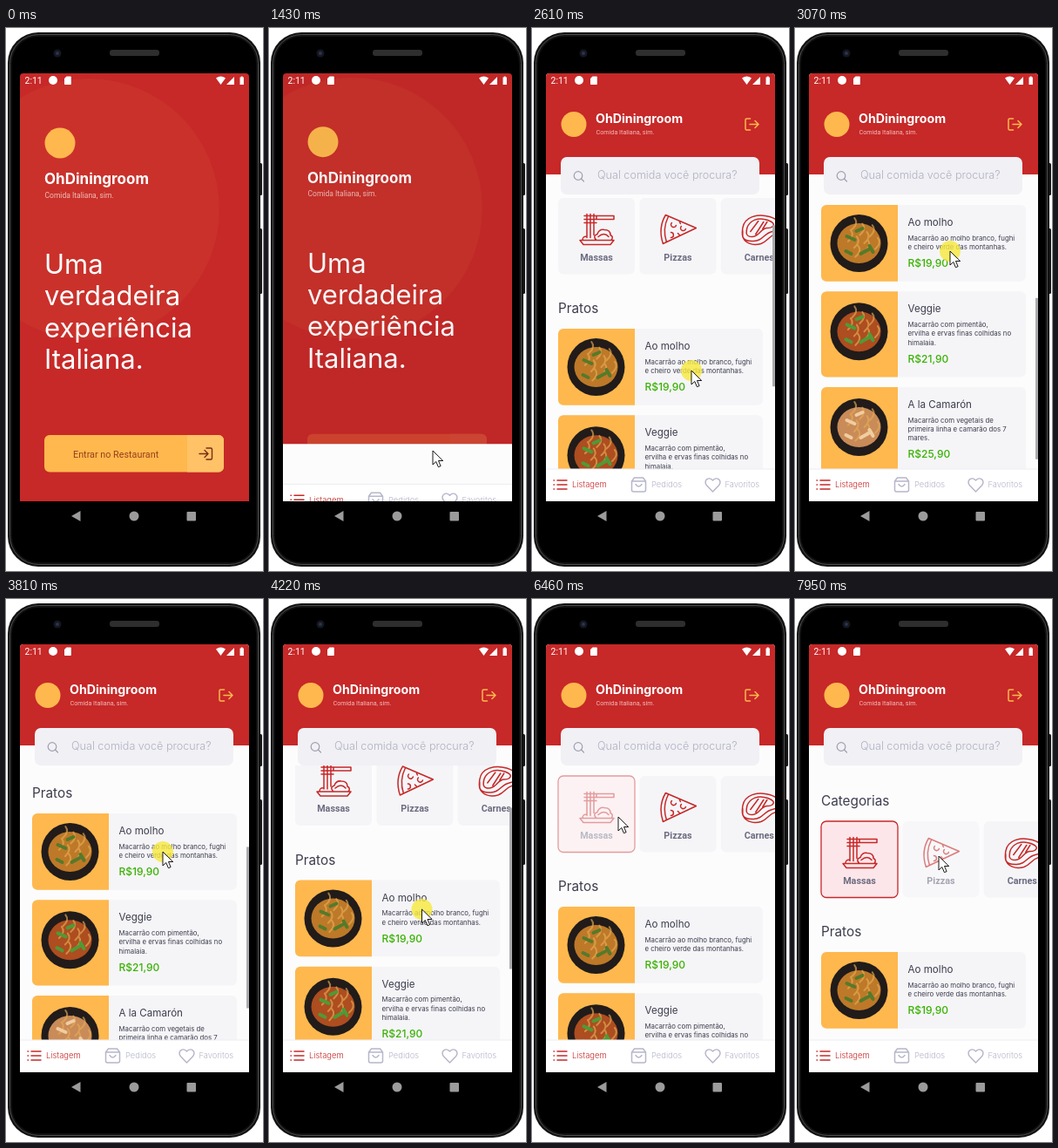
Write an HTML page that moves like this. It is 295 px wide and 623 px high and loops after 8000 ms.

```html
<!DOCTYPE html>
<html lang="pt-BR">
<head>
<meta charset="utf-8">
<title>OhDiningroom</title>
<style>
html, body { margin: 0; width: 100%; height: 100%; overflow: hidden; background: #fff; }
svg { display: block; width: 100%; height: 100%; }
text { font-family: Inter, "Open Sans", sans-serif; }
.rb { font-family: Roboto, Inter, sans-serif; }
.brand { font-weight: 700; fill: #fff; }
.line { fill: none; stroke-linecap: round; stroke-linejoin: round; }
.h1 { font-size: 31px; fill: #fff; }
.h2 { font-size: 15.3px; fill: #3d3d4d; }
.name { font-size: 11.6px; fill: #3d3d4d; }
.desc { font-size: 7.8px; fill: #3d3d4d; }
.price { font-size: 12px; font-weight: 500; fill: #39b100; }
.cat { font-size: 10.8px; font-weight: 600; fill: #6c6c80; text-anchor: middle; }
.tab { font-size: 9.4px; font-weight: 300; fill: #b7b7cc; }
</style>
</head>
<body>
<svg viewBox="0 0 295 623">
  <defs>
    <clipPath id="screenClip"><path d="M16 543V56q0-4 4-4h255q4 0 4 4v487z"/></clipPath>
    <clipPath id="revealClip"><rect id="reveal" x="16" y="52" width="263" height="491"/></clipPath>
    <clipPath id="listClip"><rect x="16" y="191" width="263" height="315"/></clipPath>
  </defs>

  <!-- phone body -->
  <g>
    <rect x="289" y="155" width="5" height="37" rx="1.5" fill="#161616"/>
    <rect x="289" y="230" width="5" height="75" rx="1.5" fill="#161616"/>
    <rect x="2" y="5" width="290" height="613" rx="35" fill="#111"/>
    <rect x="4.500" y="7.500" width="285" height="608" rx="33" fill="none" stroke="#4a4a4a"/>
    <rect x="7" y="10" width="280" height="603" rx="30" fill="#000"/>
    <rect x="119" y="25" width="57" height="7" rx="3" fill="#2e2e2e"/>
    <circle cx="59" cy="29" r="4.500" fill="#15171f"/>
    <circle cx="59" cy="29" r="2" fill="#2b3350"/>
    <g fill="#9b9b9b">
      <path d="M75 560l10.500-6v12z"/>
      <circle cx="147" cy="560" r="5.500"/>
      <rect x="207.500" y="555" width="10.500" height="10.500" rx="1"/>
    </g>
  </g>

  <g clip-path="url(#screenClip)">
    <!-- welcome screen -->
    <rect x="16" y="52" width="263" height="491" fill="#c72828"/>
    <g id="welcome">
      <circle cx="95" cy="208" r="150" fill="#ca312b"/>
      <circle cx="62" cy="132" r="17.500" fill="#ffb84d"/>
      <text class="brand" x="44" y="179" font-size="17">OhDiningroom</text>
      <text class="rb" x="44.500" y="194.500" font-size="8.500" fill="#f0bdb9">Comida Italiana, sim.</text>
      <g class="h1">
        <text x="44" y="282">Uma</text>
        <text x="44" y="318">verdadeira</text>
        <text x="44" y="354.500">experiência</text>
        <text x="44" y="391">Italiana.</text>
      </g>
      <g id="enter">
        <rect x="44" y="467" width="206" height="42.500" rx="6" fill="#ffb84d"/>
        <path d="M208 467h36a6 6 0 0 1 6 6v30.500a6 6 0 0 1-6 6h-36z" fill="#ffc267"/>
        <text class="rb" x="77" y="492.500" font-size="10.800" fill="#993d1c">Entrar no Restaurant</text>
        <path class="line" d="M230 482h5q1.500 0 1.500 1.500v10q0 1.500-1.500 1.500h-5M222 488.500h10m-4-4 4 4-4 4" stroke="#7a2d16" stroke-width="1.400"/>
      </g>
    </g>
    <rect id="shade" x="16" y="52" width="263" height="491" opacity="0"/>

    <!-- menu screen -->
    <g clip-path="url(#revealClip)">
      <g id="home">
        <rect x="16" y="52" width="263" height="491" fill="#fcfcfd"/>
        <rect x="16" y="32" width="263" height="136" fill="#c72828"/>
        <circle cx="48" cy="110.500" r="14.500" fill="#ffb84d"/>
        <text class="brand" x="73" y="108.500" font-size="14.200">OhDiningroom</text>
        <text class="rb" x="73.500" y="122" font-size="7.200" fill="#f0bdb9">Comida Italiana, sim.</text>
        <path class="line" d="M250.500 104h-4q-1.500 0-1.500 1.500v10q0 1.500 1.500 1.500h4M250 110.500h10m-4-4 4 4-4 4" stroke="#ffb84d" stroke-width="1.500"/>
        <g clip-path="url(#listClip)">
          <g id="list">
            <text class="h2" x="30" y="236.500">Categorias</text>
            <text class="h2" x="30" y="387">Pratos</text>
            <g id="cats"></g>
            <g id="dishes"></g>
          </g>
          <rect id="bar" x="276" width="3" height="185" fill="#a9a9ae"/>
        </g>
        <rect x="33" y="148" width="228" height="43" rx="7" fill="#f0f0f5"/>
        <g class="line" stroke="#a0a0b0" stroke-width="1.200">
          <circle cx="53" cy="169.500" r="4.800"/><path d="M56.500 173l3 3"/>
        </g>
        <text x="75" y="172.800" font-size="12.600" font-weight="300" fill="#b0b0c2">Qual comida você procura?</text>
        <rect x="16" y="506" width="263" height="60" fill="#fff"/>
        <path d="M16 506h263" stroke="#ececf2"/>
        <g class="line" stroke-width="1.500">
          <path d="M29 519h11M29 524h11M29 529h11M25 519h.5M25 524h.5M25 529h.5" stroke="#c72828"/>
          <g stroke="#b7b7cc">
            <path d="M114.500 520l3-4h10l3 4v10q0 2-2 2h-12q-2 0-2-2zh16M119 523.500q3.500 5 7 0"/>
            <path d="M207.500 532l-7-7.200c-4.500-5.500 2.500-11 7-5.800 4.500-5.200 11.500.3 7 5.800z"/>
          </g>
        </g>
        <text class="tab" x="46" y="527.200" style="fill:#c72828">Listagem</text>
        <text class="tab" x="137" y="527.200">Pedidos</text>
        <text class="tab" x="221.500" y="527.200">Favoritos</text>
      </g>
    </g>

    <!-- status bar -->
    <g fill="#fff">
      <text class="rb" x="21.500" y="64" font-size="10.500">2:11</text>
      <circle cx="54" cy="60" r="5"/>
      <path d="M69.500 55.500h4.500q.8 0 .8.800v8q0 .8-.8.800h-6.200q-.8 0-.8-.8v-6.300z"/>
      <path d="M241 57.500q5.500-4 11 0l-5.500 7.500z"/>
      <path d="M262 56v9h-9z"/>
      <path d="M268.500 56.500h1.200v-1h2v1h1.200v8.500h-4.400z"/>
    </g>
  </g>

  <g id="pointer">
    <circle id="press" r="12" fill="#f7e93c" opacity=".8"/>
    <path d="M0 0v16l3.800-3.500 2.600 6.200 2.700-1.100-2.600-6.100h5.200z" fill="#fff" stroke="#000" stroke-width=".9"/>
  </g>
</svg>

<script>
const $ = id => document.getElementById(id);
const LOOP = 8000, SCREEN = 491, BOTTOM = 543, DRIFT = 20;

const cats = [
  ['Massas', 'M20 2h20v4H20M6 2h14v4H6M6 10h14M9 0v27M13 0v27M17 0v24M1 30h39l-4 5H5zM4 30q0-5 5-4M20 30q-5-5 1-7 2-6 8-5 7 0 7 6 4 2 1 6M22 26q7-6 12 0'],
  ['Pizzas', 'M6 1l35 15L3 34Q-3 16 6 1zM9 3Q2 17 7 32M13 10a3 3 0 1 0 5 3M12 21a3 3 0 1 1 0 6M24 14a3 3 0 1 0 5 3M20 22l2 2M22 9l1 2'],
  ['Carnes', 'M1 16C3 3 18-1 32 3s13 15 3 17-10 11-23 11S0 24 1 16zM1 19v6c1 8 12 12 21 9 8-3 9-9 17-11 4-2 4-5 3-10M6 16C9 7 19 3 30 7s6 9-1 9-9 10-17 10S5 21 6 16zM10 20l9-12M16 23l9-14M24 17l5-8']
];
$('cats').innerHTML = cats.map(([label, icon], i) => {
  const x = 30 + i * 93.4;
  return `<g id="cat${i}" transform="translate(${x} 255)">
    <rect width="88" height="87.500" rx="6" fill="#f5f5f8"/>
    <path class="line" d="${icon}" transform="translate(24 18.500)" stroke="#c72828" stroke-width="1.500"/>
    <text class="cat rb" x="44" y="71.800">${label}</text></g>`;
}).join('');
const massas = $('cat0').firstElementChild;

const dishes = [
  ['Ao molho', 'R$19,90', '#bd7928', '#557a2a', ['Macarrão ao molho branco, fughi', 'e cheiro verde das montanhas.']],
  ['Veggie', 'R$21,90', '#ad4d20', '#4f9a36', ['Macarrão com pimentão,', 'ervilha e ervas finas colhidas no', 'himalaia.']],
  ['A la Camarón', 'R$25,90', '#c98b58', '#f0cda0', ['Macarrão com vegetais de', 'primeira linha e camarão dos 7', 'mares.']]
];
const strands = Array.from({ length: 9 }, (_, i) => {
  const a = i * 2.4, r = 6 + i * 1.7;
  return `M${(r * Math.cos(a)).toFixed(1)} ${(r * Math.sin(a)).toFixed(1)}q8-7 3-13`;
}).join('');
let nextY = 405;
$('dishes').innerHTML = dishes.map(([name, price, food, garnish, lines], i) => {
  const h = 67 + lines.length * 10.4, y = nextY;
  nextY += h + 11.5;
  return `<g id="dish${i}" transform="translate(30 ${y})">
    <rect width="235" height="${h}" rx="6" fill="#f5f5f8"/>
    <path d="M6 0h82v${h}H6a6 6 0 0 1-6-6V6a6 6 0 0 1 6-6z" fill="#ffb84d"/>
    <g transform="translate(43.500 ${i ? 46 : 44})">
      <circle r="33" fill="#211b1a"/><ellipse rx="25" ry="23" fill="${food}"/>
      <path class="line" d="${strands}" stroke="#e6ad55" stroke-width="2" opacity=".65"/>
      <path class="line" d="M-14-8l9 4M2 12l9-5M-3-14l7-3M12 3l4 7M-15 9l6 3" stroke="${garnish}" stroke-width="4"/>
    </g>
    <text class="name" x="99.500" y="24">${name}</text>
    ${lines.map((s, n) => `<text class="desc" x="99.500" y="${40.6 + n * 10.4}">${s}</text>`).join('')}
    <text class="price" x="99.500" y="${h - 16.8}">${price}</text></g>`;
}).join('');

// Rows are [time, values...]; eased between rows
const smooth = u => u * u * (3 - 2 * u);
const linear = u => u;
function track(rows, t, ease = smooth) {
  if (t <= rows[0][0]) return rows[0].slice(1);
  for (let i = 1; i < rows.length; i++) {
    const a = rows[i - 1], b = rows[i];
    if (t < b[0]) {
      const u = ease((t - a[0]) / (b[0] - a[0]));
      return a.slice(1).map((v, k) => v + (b[k + 1] - v) * u);
    }
  }
  return rows[rows.length - 1].slice(1);
}

const pointerPath = [
  [60, 268, 626], [860, 192, 487], [1000, 188, 485], [2250, 188, 485],
  [2610, 183, 393], [3070, 178, 256], [3350, 177, 228], [3630, 177, 228],
  [3810, 180, 290], [4420, 174, 378], [4650, 174, 378], [4880, 173, 381],
  [5440, 181, 385], [5480, 181, 385], [5920, 118, 173], [6260, 99, 250],
  [6480, 99, 250], [7080, 184, 386], [7130, 184, 386], [7800, 165, 295]
];
const scrollPath = [
  [2330, 0], [2610, 60], [3070, 202], [3300, 221], [3640, 221],
  [3810, 159], [4420, 57], [4650, 57], [4860, 52]
];
const barFade = [[2330, 0], [2400, 1], [5100, 1], [5400, 0]];
const enterFade = [[960, 1], [1140, 0.2]];
const massasFade = [[6310, 1], [6400, 0.45], [6470, 0.45], [6620, 1]];
const pizzaFade = [[7820, 1], [7890, 0.6]];
const presses = [[940, 1180], [2340, 4750], [6310, 6420], [7820, 7950]];
const FILTERED = 6500;

const set = (id, name, value) => $(id).setAttribute(name, value);
const show = (id, on) => set(id, 'visibility', on ? 'inherit' : 'hidden');
const fade = (id, rows, t) => set(id, 'opacity', track(rows, t, linear)[0]);

function draw(t) {
  const [x, y] = track(pointerPath, t);
  set('pointer', 'transform', `translate(${x} ${y})`);
  show('press', presses.some(([a, b]) => t >= a && t < b));

  // Menu is uncovered from the bottom while both screens drift upward
  const u = t < 1430 ? 0 : Math.min(1, (t - 1416) / 425);
  const p = 1 - (1 - u) ** 4;
  set('reveal', 'y', BOTTOM - SCREEN * p);
  set('home', 'transform', `translate(0 ${DRIFT * (1 - p)})`);
  set('welcome', 'transform', `translate(0 ${-DRIFT * p / 2})`);
  set('shade', 'opacity', 0.1 * Math.min(1, p / 0.36));

  const filtered = t >= FILTERED;
  const scroll = filtered ? 0 : track(scrollPath, t)[0];
  set('list', 'transform', `translate(0 ${-scroll})`);
  set('bar', 'y', 191 + scroll * 0.588);
  show('cats', t >= 1920);
  show('dishes', t >= 2020);
  show('dish1', !filtered && t >= 2020);
  show('dish2', !filtered && t >= 2020);

  const chosen = t >= 6440;
  massas.setAttribute('fill', chosen ? '#fde6e9' : '#f5f5f8');
  massas.setAttribute('stroke', chosen ? '#c72828' : 'none');
  massas.setAttribute('stroke-width', 1.3);

  fade('bar', barFade, t);
  fade('enter', enterFade, t);
  fade('cat0', massasFade, t);
  fade('cat1', pizzaFade, t);
}

const start = performance.now();
function tick() {
  draw((performance.now() - start) % LOOP);
  requestAnimationFrame(tick);
}
tick();
</script>
</body>
</html>
```
